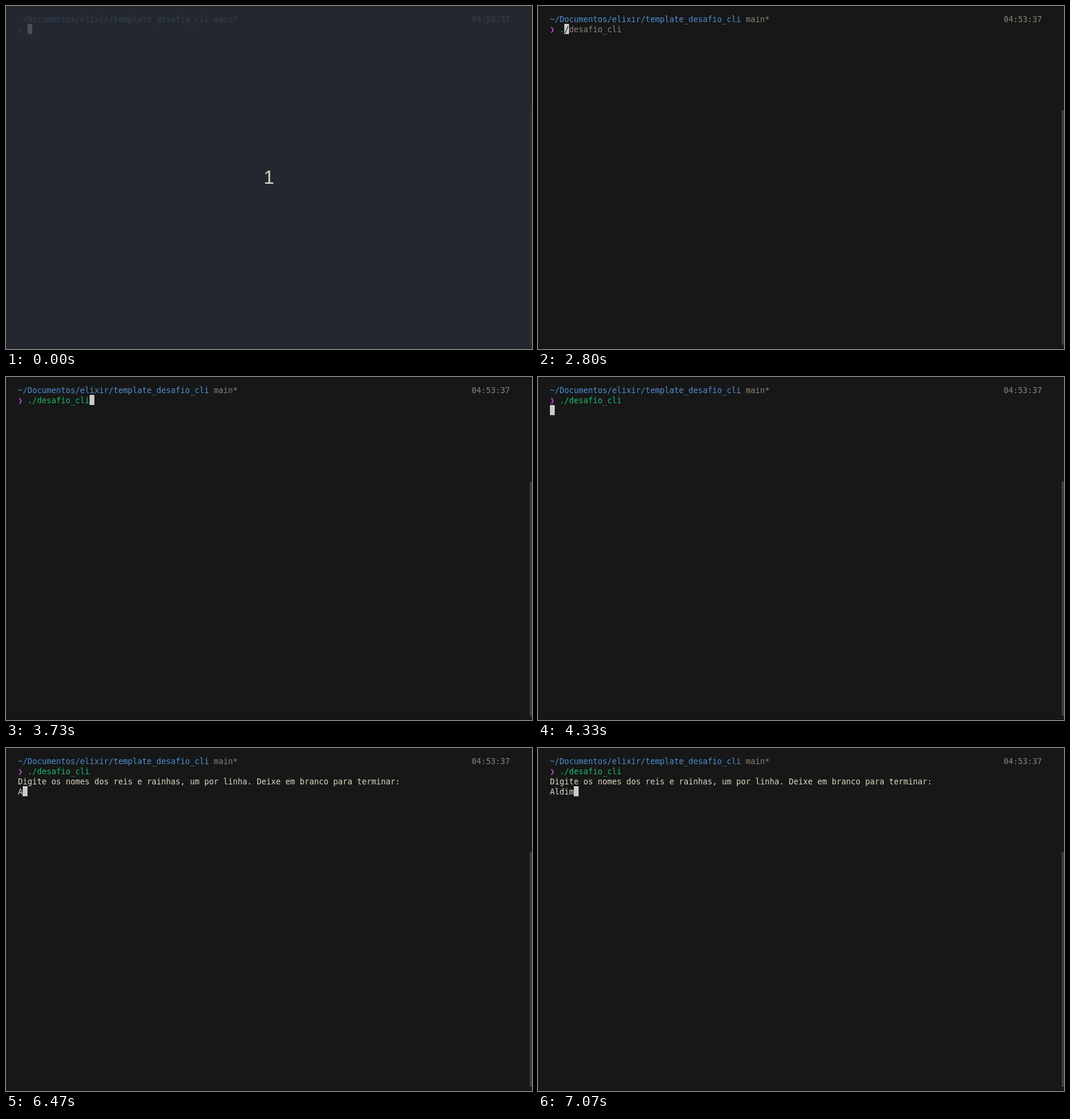
Animation of 881 by 575 pixels, one loop 8 s. Source, as an HTML page with a canvas:

```html
<!DOCTYPE html>
<html lang="pt">
<head>
<meta charset="utf-8">
<title>Terminal</title>
<style>
  html, body { margin: 0; width: 100%; height: 100%; overflow: hidden; background: #171717; }
  canvas { display: block; }
</style>
</head>
<body>
<canvas width="881" height="575"></canvas>
<script>
const ctx = document.querySelector('canvas').getContext('2d', { alpha: false });
const LOOP = 8000;
const CELL_W = 8, CELL_H = 17, LEFT = 20, TOP = 13, ASCENT = 14;
const BG = '#171717', FG = '#ded6c4', DIM = '#8c8376', BLUE = '#4e8fd3',
      GREEN = '#1db86c', MAGENTA = '#c44ccb', RED = '#cc463f', CURSOR = '#cacaca';
const COMMAND = './desafio_cli';
const PROMPT = 'Digite os nomes dos reis e rainhas, um por linha. Deixe em branco para terminar:';
const NAME = 'Aldim';
const NAME_KEYS = [6470, 6670, 6800, 7000, 7070];

function rect(x, y, w, h, color) {
  ctx.fillStyle = color;
  ctx.fillRect(x, y, w, h);
}

// Every character sits on the terminal's cell grid.
function put(text, col, row, color) {
  ctx.fillStyle = color;
  [...text].forEach((ch, i) =>
    ctx.fillText(ch, LEFT + (col + i) * CELL_W, TOP + row * CELL_H + ASCENT));
}

function cursor(col, row, under = '') {
  rect(LEFT + col * CELL_W, TOP + row * CELL_H, CELL_W, CELL_H, CURSOR);
  put(under, col, row, BG);
}

function drawCommand(t) {
  const typed = t < 2800 ? 0 : t < 3070 ? 1 : t < 3730 ? 3 : COMMAND.length;
  const partial = typed === 3;
  if (typed) put(COMMAND.slice(typed), 2 + typed, 1, DIM);
  put(COMMAND.slice(0, typed), 2, 1, partial ? FG : GREEN);
  if (partial) rect(LEFT + 2 * CELL_W, TOP + CELL_H + ASCENT + 1, typed * CELL_W, 1, FG);
  if (t < 4330) cursor(2 + typed, 1, typed ? COMMAND.charAt(typed) : '');
}

function drawInput(t) {
  if (t < 4330) return;
  if (t < 4870) return cursor(0, 2);
  const typed = NAME_KEYS.filter(key => t >= key).length;
  put(PROMPT, 0, 2, FG);
  put(NAME.slice(0, typed), 0, 3, FG);
  cursor(typed, 3);
}

function drawCountdown() {
  rect(0, 0, 881, 575, 'rgba(40, 44, 52, 0.79)');
  ctx.font = '32px "Liberation Sans", sans-serif';
  ctx.textAlign = 'center';
  ctx.fillStyle = '#d3dac8';
  ctx.fillText('1', 440.5, 298);
}

function draw(t) {
  const counting = t < 70;
  ctx.font = '13.333px "DejaVu Sans Mono", monospace';
  ctx.textAlign = 'left';
  rect(0, 0, 881, 575, BG);
  rect(877, 175, 4, 393, '#3d3d3d');
  rect(879, 18, 2, 1, '#3d3d3d');
  rect(879, 571, 2, 1, '#3d3d3d');
  rect(0, 574, 881, 1, '#101010');
  put('~/Documentos/elixir/template_desafio_cli', 0, 0, BLUE);
  put('main*', 41, 0, DIM);
  put('04:53:37', 95, 0, DIM);
  put('❯', 0, 1, counting ? RED : MAGENTA);
  drawCommand(t);
  drawInput(t);
  if (counting) drawCountdown();
}

const start = performance.now();
function tick() {
  draw((performance.now() - start) % LOOP);
  requestAnimationFrame(tick);
}
tick();
</script>
</body>
</html>
```
